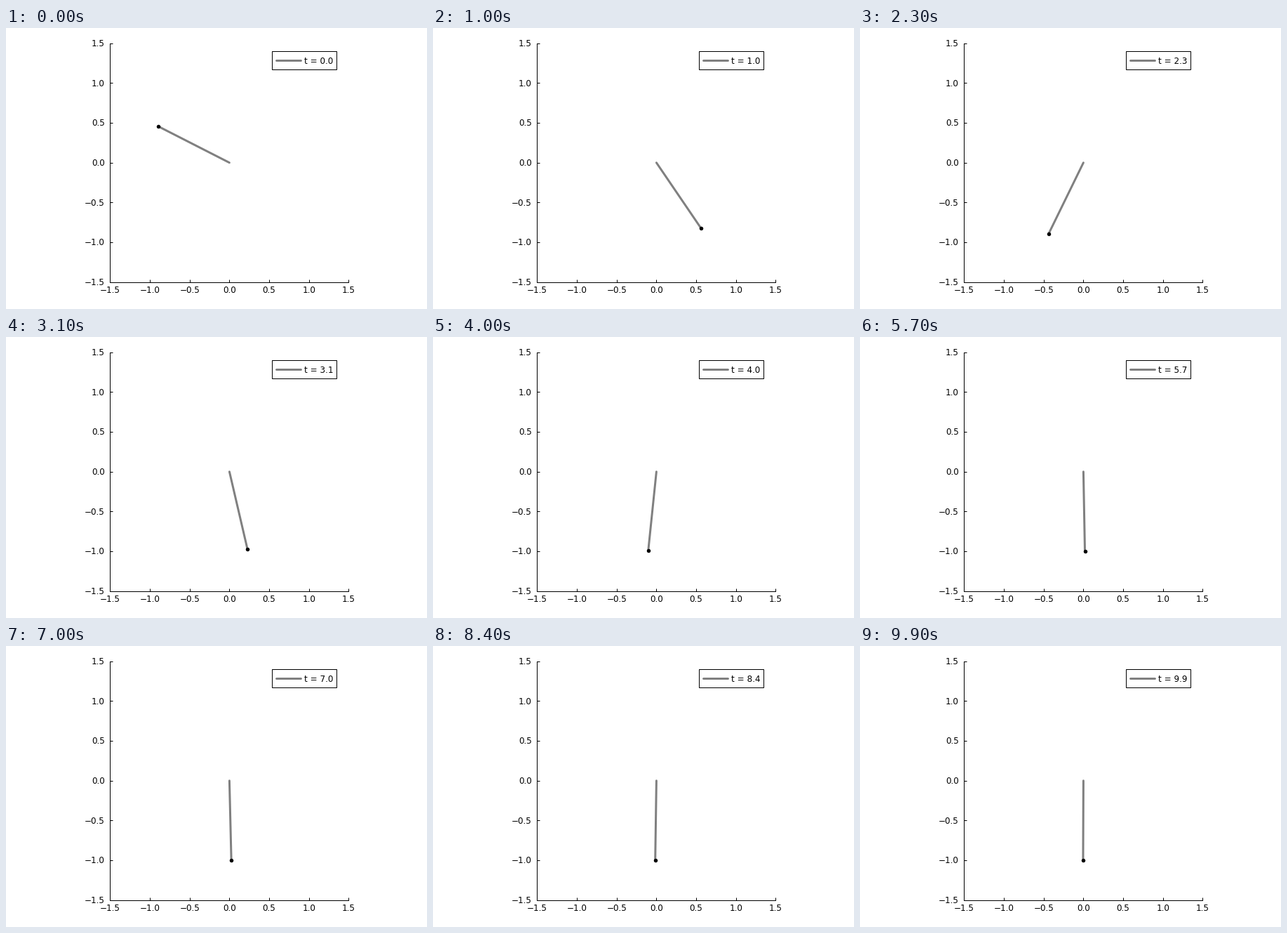
Write a matplotlib script that moves like this. It is 600 px wide and 400 px high and loops after 10000 ms.

```python
import math
import matplotlib.pyplot as plt
from matplotlib.animation import FuncAnimation
from matplotlib.patches import Rectangle

W, H, DPI = 600, 400, 72
FRAMES, DT = 100, 0.1
GRAVITY, DAMPING, START = 9.81, 2.0, -0.65 * math.pi
CX, CY, UNIT = 318.4, 191.7, 113.3
LEFT, RIGHT, TOP, BOTTOM = 148.4, 488.4, 21.7, 361.6

plt.rcParams["font.family"] = "DejaVu Sans"
plt.rcParams["font.size"] = 12


def swing():
    """Damped pendulum angles, stepped with explicit Euler."""
    angle, speed = START, 0.0
    angles = []
    for _ in range(FRAMES):
        accel = -GRAVITY * math.sin(angle) - DAMPING * speed
        angle, speed = angle + speed * DT, speed + accel * DT
        angles.append(angle)
    return angles


def to_px(x, y):
    return CX + UNIT * x, CY - UNIT * y


fig = plt.figure(figsize=(W / DPI, H / DPI), dpi=DPI, facecolor="white")
ax = fig.add_axes([0, 0, 1, 1])
ax.set_xlim(0, W)
ax.set_ylim(H, 0)
ax.axis("off")


def line(xs, ys, color="black", width=1.0, cap="butt"):
    return ax.plot(xs, ys, color=color, lw=width, solid_capstyle=cap)[0]


def label(x, base, text, ha):
    return ax.text(x, base, text, ha=ha, va="baseline", color="black")


line([LEFT, LEFT], [TOP, BOTTOM], cap="projecting")
line([LEFT, RIGHT], [BOTTOM, BOTTOM], cap="projecting")
for k in range(-3, 4):
    value = k / 2
    x, y = to_px(value, value)
    text = f"{value:.1f}".replace("-", "\u2212")
    line([x, x], [BOTTOM, BOTTOM - 4])
    line([LEFT, LEFT + 4], [y, y])
    label(x, 377.4, text, "center")
    label(140.6, y + 4.4, text, "right")

ax.add_patch(Rectangle((379.4, 33.4), 92, 26, fc="white", ec="black", lw=1))
line([385, 420], [46.1, 46.1], "#808080", 3, "round")
clock = label(424.8, 50.7, "", "left")

rod = line([], [], "#808080", 3, "round")
bob, = ax.plot([], [], "o", color="black", ms=5.5, mew=0)
angles = swing()


def draw(i):
    x, y = to_px(math.sin(angles[i]), -math.cos(angles[i]))
    rod.set_data([CX, x], [CY, y])
    bob.set_data([x], [y])
    clock.set_text(f"t = {i * DT:.1f}")
    return rod, bob, clock


anim = FuncAnimation(fig, draw, frames=FRAMES, interval=100,
                     repeat=True, repeat_delay=0)
plt.show()
```
